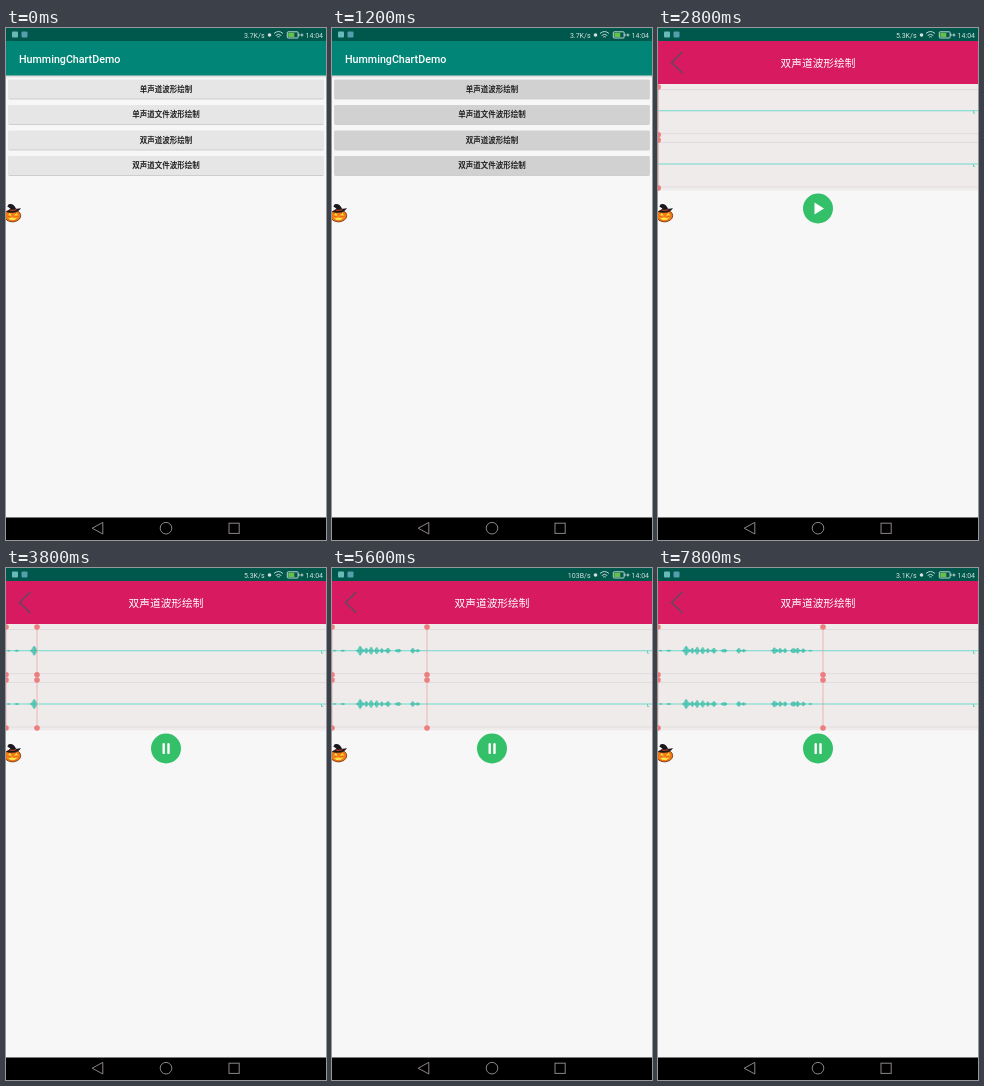
Write an HTML page that moves like this. It is 320 px wide and 512 px high and loops after 8000 ms.

```html
<!DOCTYPE html>
<html lang="zh">
<head>
<meta charset="utf-8">
<style>
html, body { margin: 0; width: 100%; height: 100%; overflow: hidden; background: #f7f7f7; }
svg { display: block; width: 100vw; height: 100vh; }
text { font-family: Roboto, "Noto Sans CJK SC", "Noto Sans CJK", sans-serif; }
.label { font-size: 7.5px; font-weight: 700; fill: #222; text-anchor: middle; }
.status { font-size: 7px; fill: #d3e1de; text-anchor: end; }
</style>
</head>
<body>
<svg viewBox="0 0 320 512">
  <defs>
    <linearGradient id="shade" x2="0" y2="1">
      <stop stop-color="#000" stop-opacity=".16"/>
      <stop offset="1" stop-color="#000" stop-opacity="0"/>
    </linearGradient>
    <clipPath id="played"><rect id="playedBox" y="56" width="0" height="107"/></clipPath>
  </defs>
  <rect width="320" height="512" fill="#f7f7f7"/>

  <g id="menu">
    <rect y="13" width="320" height="34.5" fill="#008577"/>
    <rect y="47.5" width="320" height="2.5" fill="url(#shade)"/>
    <text x="13" y="35" font-size="10.7" font-weight="500" fill="#fff">HummingChartDemo</text>
    <g id="buttons"></g>
  </g>

  <g id="player">
    <rect y="13" width="320" height="43" fill="#d81b60"/>
    <path d="M24.5 24 13.5 34.5 24.5 45" fill="none" stroke="#69475a" stroke-width="1.6"/>
    <text x="160" y="39" font-size="10.7" fill="#fff" text-anchor="middle">双声道波形绘制</text>
    <rect y="56" width="320" height="106.5" fill="#efebeb"/>
    <g id="channels"></g>
    <circle cx="160" cy="180.5" r="15" fill="#34bf69"/>
    <path id="pause" d="M157.7 176.3v8.6M162.5 176.3v8.6" stroke="#fff" stroke-width="2.4" stroke-linecap="round"/>
    <path id="play" d="M156.5 174.5 166 180.5 156.5 186.5Z" fill="#fff"/>
  </g>

  <g id="pumpkin">
    <ellipse cx="6.5" cy="187.7" rx="8.2" ry="6.2" fill="#f47a14" stroke="#6b2a08" stroke-width=".8"/>
    <path d="M4 183q-3 5 0 10M9 183q3 5 0 10" fill="none" stroke="#c9500b" stroke-width=".7"/>
    <path d="M2 187.5 3.5 184.8 5.8 187.5ZM8 187.5 10.4 184.8 12 187.5ZM1.5 189.3 4 190 6 189.3 8.5 190 11.8 189 9 192 4 192Z" fill="#ffe04a"/>
    <path d="M0 183.7Q3.5 182.4 4.4 180.5L1.3 178.6 2.7 176.2Q7.8 175 10 180.8 13 181 15 180 12.5 184.5 6 184.8 2 185 0 183.7Z" fill="#1d1720"/>
    <path d="M4.2 181.2Q7 182.4 10.2 180.9L10.5 182.2Q7 183.7 3.5 182.4Z" fill="#a83e1d"/>
  </g>

  <rect width="320" height="13" fill="#00574b"/>
  <rect x="6" y="3.5" width="6" height="6" rx="1" fill="#69b9b8"/>
  <rect x="15.5" y="3.5" width="6" height="6" rx="1" fill="#559eac"/>
  <text id="speed" class="status" x="258.5" y="9.5"></text>
  <circle cx="263.5" cy="7" r="1.8" fill="#d3e1de"/>
  <g fill="none" stroke="#d3e1de" stroke-width=".9">
    <path d="M268 5.5q4.5-4 9 0M269.7 7.5q2.8-2.4 5.6 0M271.2 9.1q1.3-1 2.6 0"/>
    <rect x="281.3" y="3.8" width="10.8" height="6.2" rx=".8"/>
    <path d="M293 5.7v2.4M294.4 7h3M295.9 5.5v3"/>
  </g>
  <rect x="282.3" y="4.8" width="6" height="4.2" fill="#63c04a"/>
  <text class="status" x="317" y="9.5">14:04</text>

  <rect y="489.5" width="320" height="22.5" fill="#000"/>
  <g fill="none" stroke="#8d8589" stroke-width="1">
    <path d="M86.2 500.2 96.8 494.4V506Z"/>
    <circle cx="160" cy="500.2" r="5.8"/>
    <rect x="223" y="495.2" width="10.2" height="10.2"/>
  </g>
</svg>
<script>
const LOOP = 8000, STEP = 200, OPEN = 2600, START = 2900;
const $ = id => document.getElementById(id);
const labels = ["单声道波形绘制", "单声道文件波形绘制", "双声道波形绘制", "双声道文件波形绘制"];
const head = [[START, 0], [3800, 31], [4800, 69.5], [6400, 120.5], [7800, 165], [LOOP, 171]];
const speeds = [[0, "3.7K/s"], [1600, "5.3K/s"], [4600, "103B/s"], [7600, "3.1K/s"]];
// centre, height, half width of each sound burst
const bursts = [
  [2.5, 1.2, 1.1], [11, 1, 2.2], [28.5, 5, 3], [34.5, 3.2, 1.7], [39, 4, 2.1],
  [44.5, 3.7, 2.1], [49.5, 3, 1.7], [55.5, 3.2, 2.3], [66, 2.8, 2.2], [81, 3, 2],
  [85.5, 1.6, 2.2], [117, 4, 2.5], [122.5, 3.2, 1.9], [127, 2.4, 1.8],
  [135.5, 4, 2.1], [140, 3.5, 1.9], [145.5, 2.5, 1.9], [152.5, 1.2, 1.6]
];

$("buttons").innerHTML = labels.map((s, i) => {
  const y = 51.4 + i * 25.5;
  return `<rect x="2.5" y="${y + 1}" width="315" height="19.2" rx="1.2" fill="#000" opacity=".17"/>
    <rect class="face" x="2.2" y="${y}" width="315.6" height="19.2" rx="1.2"/>
    <text class="label" x="160" y="${y + 12.2}">${s}</text>`;
}).join("");
const faces = document.querySelectorAll(".face");

function level(x) {
  const peak = Math.max(...bursts.map(([c, h, w]) => h * Math.exp(-(((x - c) / w) ** 2))));
  return peak * (0.8 + 0.2 * Math.sin(x * 7.3));
}

function wave(y) {
  let d = "";
  for (let x = 0; x < 172; x += 0.75) {
    const a = level(x);
    if (a > 0.25) d += `M${x} ${(y - a).toFixed(1)}V${(y + a).toFixed(1)}`;
  }
  return d;
}

function channel(top, bottom, mid) {
  const dots = `<circle cy="${top}" r="2.8"/><circle cy="${bottom}" r="2.8"/>`;
  const marker = cls => `<g class="${cls}" fill="#ed7e80">
    <path d="M0 ${top}V${bottom}" stroke="#ed9c9e" stroke-width=".7"/>${dots}</g>`;
  return `<path d="M0 ${top + 2.5}H320M0 ${bottom - 1}H320" stroke="#dcd9da" stroke-width=".8"/>
    <path d="M0 ${mid}H320" stroke="#70d9cc" stroke-width="1.1"/>
    <path d="M315.5 ${mid}v2.5h1.6" fill="none" stroke="#4fc9ba" stroke-width=".8"/>
    <path d="${wave(mid)}" stroke="#39bea9" stroke-width=".8" clip-path="url(#played)"/>
    ${marker("edge")}${marker("cursor")}`;
}
$("channels").innerHTML = channel(59, 106.7, 82.7) + channel(112, 160, 136);
const cursors = document.querySelectorAll(".cursor");

function position(t) {
  if (t <= START) return 0;
  const i = head.findIndex(p => p[0] >= t);
  const [t0, x0] = head[i - 1], [t1, x1] = head[i];
  return x0 + (x1 - x0) * (t - t0) / (t1 - t0);
}

const show = (id, on) => $(id).setAttribute("display", on ? "inline" : "none");

function draw(ms) {
  const t = Math.floor((ms % LOOP) / STEP) * STEP;
  const x = position(t);
  show("menu", t < OPEN);
  show("player", t >= OPEN);
  show("pause", t >= START);
  show("play", t < START);
  faces.forEach((f, i) => {
    const pressed = i === 2 && t === OPEN - STEP;
    f.setAttribute("fill", t < STEP ? "#e7e6e7" : pressed ? "#c4c4c4" : "#d1d1d1");
  });
  $("playedBox").setAttribute("width", x);
  cursors.forEach(c => c.setAttribute("transform", `translate(${x})`));
  $("speed").textContent = speeds.filter(s => s[0] <= t).pop()[1];
}

const begin = performance.now();
function tick() {
  draw(performance.now() - begin);
  requestAnimationFrame(tick);
}
tick();
</script>
</body>
</html>
```
